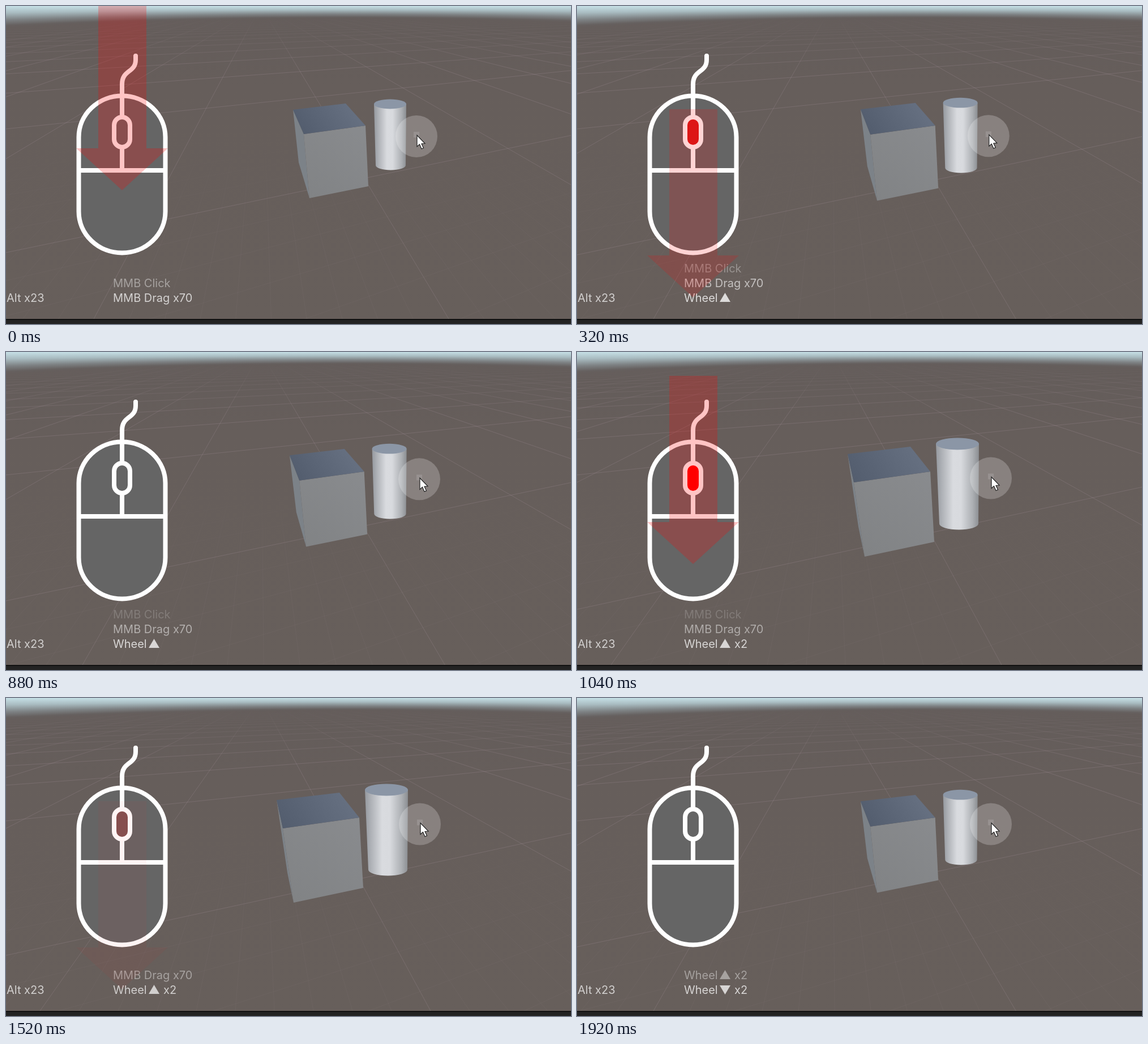
Write an HTML page with a canvas that moves like this. It is 998 by 561 pixels and loops after 2 s.

```html
<!DOCTYPE html>
<html lang="en">
<head>
<meta charset="utf-8">
<title>Scroll wheel zoom</title>
<style>
  html, body { margin: 0; width: 100%; height: 100%; overflow: hidden; background: #675f5b; }
  canvas { display: block; }
</style>
</head>
<body>
<canvas id="stage" width="998" height="561"></canvas>
<script>
const W = 998, H = 561, LOOP = 2000, STEP = 80;
const ctx = document.getElementById('stage').getContext('2d');
const mix = (a, b, u) => a + (b - a) * u;
const clamp = v => Math.max(0, Math.min(1, v));

// Linear interpolation through [time, value] pairs.
function track(keys, t) {
  let i = 1;
  while (i < keys.length - 1 && t > keys[i][0]) i++;
  const [t0, a] = keys[i - 1], [t1, b] = keys[i];
  return mix(a, b, clamp((t - t0) / (t1 - t0)));
}

function gradient(x0, y0, x1, y1, stops) {
  const g = ctx.createLinearGradient(x0, y0, x1, y1);
  for (const [at, color] of stops) g.addColorStop(at, color);
  return g;
}

function polygon(points, fill) {
  ctx.beginPath();
  for (const [x, y] of points) ctx.lineTo(x, y);
  ctx.closePath();
  ctx.fillStyle = fill;
  ctx.fill();
}

function line(x0, y0, x1, y1) {
  ctx.beginPath();
  ctx.moveTo(x0, y0);
  ctx.lineTo(x1, y1);
  ctx.stroke();
}

function sky() {
  for (let x = 0; x < W; x += 4) {
    const h = 23 + 17 * ((x - 600) / 600) ** 2;
    ctx.fillStyle = gradient(0, 0, 0, h, [
      [0, '#c6e0e6'], [0.3, '#a9bcc1'], [0.62, '#7d8183'],
      [0.85, '#666160'], [1, 'rgba(100,93,91,0)']
    ]);
    ctx.fillRect(x, 0, 4, h);
  }
}

// Perspective floor: one family of lines runs to the far right, one to the horizon.
function floor(zoom) {
  ctx.fillStyle = gradient(0, 0, 0, H, [[0, '#635c5a'], [0.25, '#665e5b'], [1, '#675f5b']]);
  ctx.fillRect(0, 0, W, H);
  const ink = (from, to, a) => gradient(0, from, 0, to, [[0, 'rgba(165,145,155,0)'], [1, `rgba(165,145,155,${a})`]]);
  const near = 1 / mix(430, 449, zoom);
  const across = q => line(0, 5 + 1 / q, 2100, 0);
  const x0 = mix(155, 60, zoom), gap = mix(627, 690, zoom);
  const away = n => line(450, 0, x0 + gap * n, 552);

  ctx.lineWidth = 1;
  ctx.strokeStyle = ink(230, 430, 0.07);
  for (let k = -8; k < 10; k++) if (k) across(near - 0.00024 * k);
  for (let k = -12; k < 28; k++) if (k % 10) away(k / 10);

  ctx.strokeStyle = ink(18, 110, 0.27);
  across(near);
  for (let n = 0; n < 24; n++) across(0.00472 + 0.002 * n);
  for (let n = -6; n < 10; n++) away(n);
}

function solids(zoom) {
  const p = (ax, ay, bx, by) => [mix(ax, bx, zoom), mix(ay, by, zoom)];
  const back = p(507, 183, 478, 180), far = p(600, 172, 589, 167);
  const right = p(635, 211, 624, 211), front = p(526, 226, 489, 230);
  const footR = p(640, 318, 631, 335), footF = p(536, 339, 508, 361);
  polygon([back, front, footF, p(517, 276, 497, 308)], '#7c8288');
  polygon([front, right, footR, footF],
    gradient(...right, ...footF, [[0, '#898b8e'], [1, '#818385']]));
  polygon([back, far, right, front],
    gradient(...far, ...front, [[0, '#656f80'], [1, '#535d6e']]));

  const [l, top] = p(650, 173, 634, 162), [r, ry] = p(707, 8.5, 710, 10.5);
  const [bl, bottom] = p(653, 281, 640, 303), [br] = p(706, 0, 709, 0);
  ctx.beginPath();
  ctx.moveTo(l, top);
  ctx.lineTo(bl, bottom);
  ctx.ellipse((bl + br) / 2, bottom, (br - bl) / 2, ry, 0, Math.PI, 0, true);
  ctx.lineTo(r, top);
  ctx.fillStyle = gradient(l, 0, r, 0, [
    [0, '#95999f'], [0.15, '#b0b3b8'], [0.4, '#d9dbdf'], [0.58, '#d8dade'], [0.85, '#adb0b4'], [1, '#8b8e92']
  ]);
  ctx.fill();
  ctx.beginPath();
  ctx.ellipse((l + r) / 2, top, (r - l) / 2, ry, 0, 0, 7);
  ctx.fillStyle = '#8b96a6';
  ctx.fill();
}

function cursor(x, y) {
  ctx.fillStyle = 'rgba(255,255,255,.22)';
  ctx.beginPath();
  ctx.arc(x, y, 37, 0, 7);
  ctx.fill();
  ctx.fillStyle = 'rgba(255,255,255,.13)';
  ctx.fillRect(x - 5, y - 8, 10, 10);
  ctx.save();
  ctx.translate(x + 1, y - 2);
  polygon([[0, 0], [0, 20], [4.5, 16], [8, 24], [11.5, 22.5], [8, 15], [14, 14.5]], '#fff');
  ctx.strokeStyle = '#222';
  ctx.lineWidth = 1.2;
  ctx.stroke();
  ctx.restore();
}

function mouse(red) {
  ctx.strokeStyle = '#fff';
  ctx.lineWidth = 8;
  ctx.lineCap = 'round';
  ctx.beginPath();
  ctx.roundRect(128.5, 158.5, 153, 277, [{ x: 76.5, y: 73 }]);
  ctx.fillStyle = '#656565';
  ctx.fill();
  ctx.stroke();
  ctx.stroke(new Path2D('M229 88V95C229 118 205 112 205 138V194M205 251V289M129 290H281'));
  ctx.beginPath();
  ctx.roundRect(191, 196, 28, 53, 14);
  ctx.fillStyle = `rgba(255,0,0,${red})`;
  ctx.fill();
  ctx.stroke();
  ctx.lineCap = 'butt';
}

function arrow(top, alpha) {
  const neck = top + 258;
  polygon([[163, top], [248, top], [248, neck], [286, neck], [205, neck + 74], [124, neck], [163, neck]],
    `rgba(255,0,0,${0.23 * alpha})`);
}

function label(text, row, alpha, x = 189) {
  const y = 522 - 26 * row;
  ctx.fillStyle = `rgba(255,255,255,${alpha})`;
  const [word, sign, count] = text.split(/\s*([▲▼])\s*/);
  ctx.fillText(word, x, y);
  if (!sign) return;
  const [base, tip] = sign === '▲' ? [y, y - 16] : [y - 15, y + 1];
  polygon([[252, base], [271, base], [261.5, tip]], ctx.fillStyle);
  ctx.fillText(count, 278, y);
}

function captions(t) {
  ctx.font = '20px Inter, sans-serif';
  label('Alt x23', 0, 0.7, 1);
  const up = t >= 240, down = t >= 1680;
  const row = up + down;
  if (t < 1360) label('MMB Click', row + 1, track([[0, 0.42], [160, 0.4], [560, 0.21], [1360, 0.16]], t));
  if (t < 1840) label('MMB Drag x70', row, track([[0, 0.72], [560, 0.54], [1520, 0.42], [1840, 0.25]], t));
  if (up) label('Wheel ▲' + (t >= 1040 ? ' x2' : ''), +down, track([[240, 0.78], [1200, 0.74], [1520, 0.7], [1920, 0.42]], t));
  if (down) label('Wheel ▼' + (t >= 1840 ? ' x2' : ''), 0, 0.74);
}

function draw(t) {
  const zoom = t < 240 ? 0 : t < 1040 ? 0.21 : t < 1680 ? 1 : t < 1840 ? 0.55 : 0.21;
  floor(zoom);
  sky();
  solids(zoom);
  cursor(track([[0, 725], [160, 726], [560, 728], [1040, 731]], t),
         track([[160, 230], [560, 228], [1040, 222.5]], t));

  // Two scroll flicks; the wheel lights up one step after its arrow appears.
  const start = t < 960 ? 0 : 960, age = t - start;
  const fade = clamp((640 - age) / 435);
  mouse(age >= STEP ? fade : 0);
  captions(t);
  const path = start
    ? [[0, 3], [80, 42], [160, 88], [240, 131], [320, 165], [400, 182]]
    : [[0, -7], [80, 58], [160, 120], [240, 160], [320, 182]];
  if (fade) arrow(track(path, age), fade);

  ctx.fillStyle = '#232323';
  ctx.fillRect(0, 553, W, 8);
  ctx.fillStyle = '#111';
  ctx.fillRect(0, 552, W, 2);
}

function tick() {
  draw(Math.floor(performance.now() % LOOP / STEP) * STEP);
  requestAnimationFrame(tick);
}
tick();
</script>
</body>
</html>
```
